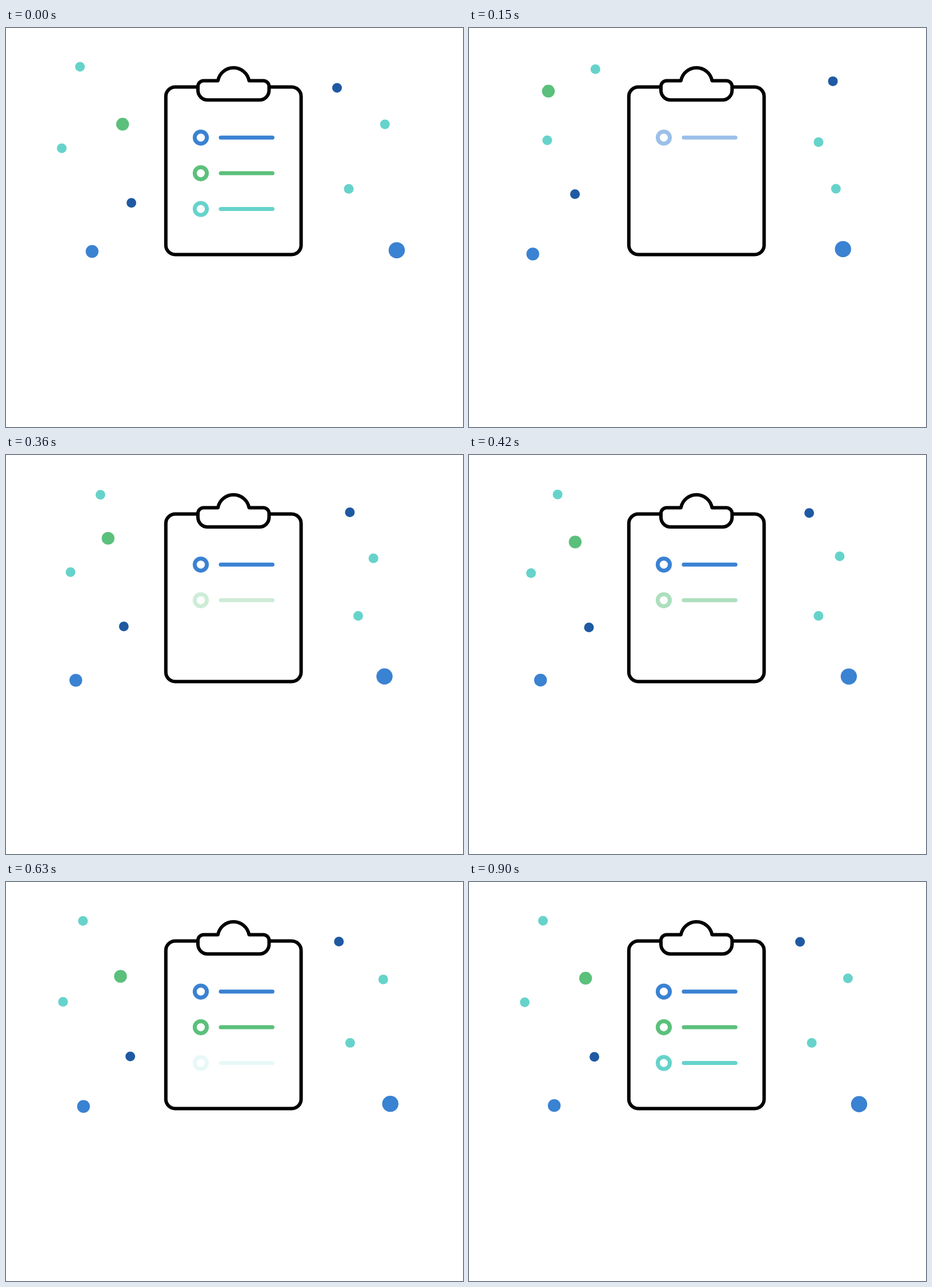
These frames come from a looping animation (800 by 700 pixels, 0.93 s). An HTML page:

```html
<!DOCTYPE html>
<html lang="en">
<head>
<meta charset="utf-8">
<title>Checklist</title>
<style>
  html, body { margin: 0; width: 100%; height: 100%; overflow: hidden; background: #fff; }
  svg { display: block; width: 800px; height: 700px; }
</style>
</head>
<body>
<svg id="stage" viewBox="0 0 800 700">
  <g fill="#fff" stroke="#000" stroke-width="6" stroke-linejoin="round">
    <rect x="279.8" y="103.5" width="236.8" height="294" rx="16.5"/>
    <path d="M371 92.5H346a10 10 0 0 0-10 10V109.3a17 17 0 0 0 17 17H443.5a17 17 0 0 0 17-17V102.5a10 10 0 0 0-10-10H425.5A27.7 27.7 0 0 0 371 92.5Z"/>
  </g>
</svg>
<script>
const LOOP = 930, STEP = 30, FADE = 300;
const BLUE = '#3a82d2', NAVY = '#1f59a2', GREEN = '#5bc07b', TEAL = '#66d3cb';
const stage = document.getElementById('stage');

function add(parent, tag, attrs) {
  const el = document.createElementNS('http://www.w3.org/2000/svg', tag);
  for (const key in attrs) el.setAttribute(key, attrs[key]);
  return parent.appendChild(el);
}

const linear = u => u;
const easeOut = u => 1 - (1 - u) ** 3;

// colour, radius, end x, end y, offset at the start x, y
const dots = [
  [TEAL, 8.5, 129.5, 68, 141, 6.6, easeOut],
  [GREEN, 11.2, 204.1, 168.8, -100, -89.1, easeOut],
  [TEAL, 8.5, 97.6, 211.1, 60.5, -21.6, easeOut],
  [NAVY, 8.5, 219.5, 306.8, -52.2, -23.4, easeOut],
  [NAVY, 8.5, 579.5, 105.1, 88.3, -18, easeOut],
  [TEAL, 8.5, 663.3, 169.1, -79, 48, easeOut],
  [TEAL, 8.5, 600, 282.3, 65, -0.6, easeOut],
  [BLUE, 11.2, 150.7, 392, -45, 5.2, linear],
  [BLUE, 14.2, 684, 389.9, -33.8, -2.3, linear]
].map(([fill, r, x, y, dx, dy, ease]) =>
  ({ el: add(stage, 'circle', { r, fill }), x, y, dx, dy, ease }));

// colour, height, fade start
const rows = [
  [BLUE, 192.3, 0],
  [GREEN, 254.8, 272],
  [TEAL, 317.5, 585]
].map(([stroke, y, start]) => {
  const el = add(stage, 'g', { stroke, fill: 'none', 'stroke-width': 7 });
  add(el, 'circle', { cx: 341, cy: y, r: 10.6 });
  add(el, 'line', { x1: 376, x2: 466.4, y1: y, y2: y, 'stroke-linecap': 'round' });
  return { el, start };
});

function draw(ms) {
  // The loop opens on the finished pose, then restarts.
  const t = Math.floor((ms % LOOP) / STEP) * STEP || LOOP;
  const u = (t - STEP) / (LOOP - STEP);
  for (const d of dots) {
    const left = 1 - d.ease(u);
    d.el.setAttribute('cx', d.x + d.dx * left);
    d.el.setAttribute('cy', d.y + d.dy * left);
  }
  for (const r of rows) {
    const alpha = Math.min(1, Math.max(0, (t - r.start) / FADE));
    r.el.setAttribute('opacity', alpha);
  }
}

const begin = performance.now();
function tick() {
  draw(performance.now() - begin);
  requestAnimationFrame(tick);
}
tick();
</script>
</body>
</html>
```
